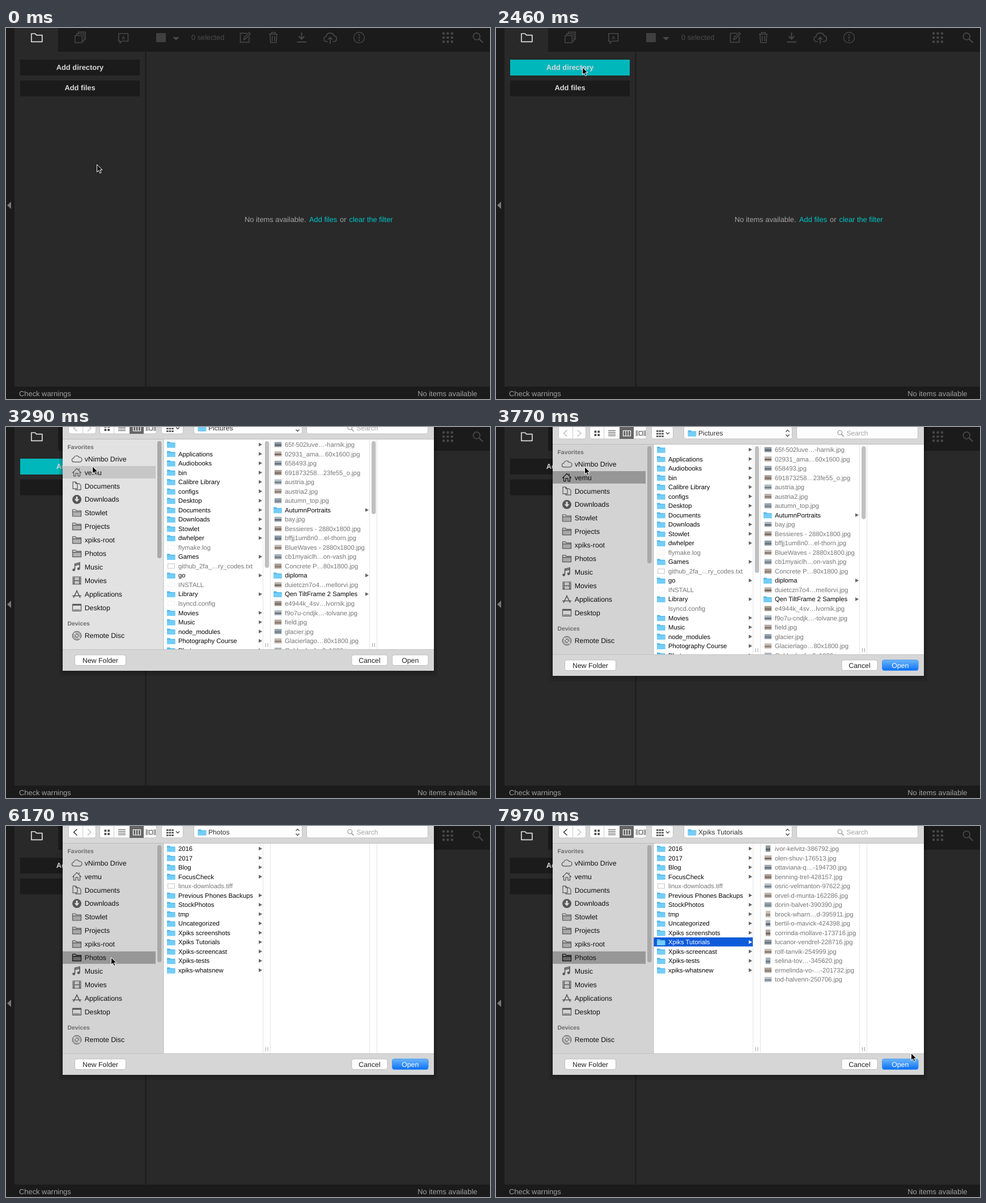
Animation of 854 by 656 pixels, one loop 8 s. Source, as an HTML page:

```html
<!DOCTYPE html>
<html lang="en">
<head>
<meta charset="utf-8">
<title>Add directory</title>
<style>
html, body { margin: 0; width: 100%; height: 100%; overflow: hidden; background: #292929; }
svg { display: block; width: 100%; height: 100%; }
text { font-family: "Liberation Sans", Arial, sans-serif; text-rendering: geometricPrecision; white-space: pre; }
</style>
</head>
<body>
<svg id="stage" viewBox="0 0 854 656"></svg>
<script>
const LOOP = 8000;
const ROW = 16.53;

// Drawing helpers
const rect = (x, y, w, h, fill, more = '') =>
  `<rect x="${x}" y="${y}" width="${w}" height="${h}" fill="${fill}" ${more}/>`;
const text = (x, y, s, size, fill, more = '') =>
  `<text x="${x}" y="${y}" font-size="${size}" fill="${fill}" ${more}>${s}</text>`;
const fillPath = (d, fill, more = '') => `<path d="${d}" fill="${fill}" ${more}/>`;
const line = (d, color, w = 1, more = '') =>
  `<path d="${d}" fill="none" stroke="${color}" stroke-width="${w}" ${more}/>`;
const dot = (x, y, r, fill, more = '') => `<circle cx="${x}" cy="${y}" r="${r}" fill="${fill}" ${more}/>`;
const group = (id, body, more = '') => `<g id="${id}" ${more}>${body}</g>`;
const grid = (n, x, y, step, draw) =>
  Array.from({ length: n * n }, (_, i) => draw(x + i % n * step, y + Math.floor(i / n) * step)).join('');
const MID = 'text-anchor="middle"';
const BOLD = 'font-weight="bold"';

function appWindow() {
  const bar = '#1b1b1b', dim = '#474747';
  const icons = [
    line('M44.8 10h6.5l2.5 2.6h10v11.7h-19z', '#dedede', 1.7, 'stroke-linejoin="round"'),
    line('M121.7 13.5h12.5v12.5h-12.5zM124.6 13v-2.8h13v13h-3M127.7 10v-2.8h12.5v12.6h-2.6', dim, 1.4),
    line('M198.8 9.8h16.6v13.4h-10.5l-3.6 3.5v-3.5h-2.5z', dim, 1.6),
    text(207.2, 20, 'A', 8, dim, `${MID} ${BOLD}`),
    rect(265, 9, 17, 16, '#404040'),
    fillPath('M294 16h12l-6 6z', dim),
    text(327, 21, '0 selected', 12.8, '#4c4c4c'),
    line('M425 9.3h-11.5v16h15.5v-10', dim, 1.6),
    line('M419.5 20.5l1-4 8.5-8.5 2.2 2.3-8.3 8.5z', dim, 1.5),
    line('M464 10.7h15M468.5 10.5v-2.7h6.5v2.7M465.8 11l1 14.8h10l1-14.8M469.7 14v9M474 14v9', dim, 1.6),
    line('M521.5 8v11M516.5 14.5l5 5 5-5M513.5 24.7h16.5', dim, 2),
    line('M568 24h-3a4.6 4.6 0 0 1-.4-9a7.5 7.5 0 0 1 14.4-1.2a5.2 5.2 0 0 1 .3 10.2h-3M572 28v-11M568 20.5l4-4 4 4', dim, 1.7),
    dot(623, 17, 9.5, 'none', `stroke="${dim}" stroke-width="1.3"`),
    [12.3, 17, 21.7].map(y => dot(623, y, 1.4, dim)).join(''),
    grid(3, 770, 7.5, 7.4, (x, y) => rect(x, y, 4.2, 4.2, dim, 'rx="1.4"')),
    dot(830.3, 14.8, 6, 'none', `stroke="${dim}" stroke-width="1.7"`),
    line('M834.7 19.2l6.8 6.8', dim, 2.2)
  ].join('');
  const button = (y, s, id) => rect(25, y, 211, 28, bar, `id="${id}"`) +
    text(130.5, y + 17.6, s, 12.85, '#d8d8d8', `${MID} ${BOLD}`);
  return rect(0, 0, 854, 656, '#292929') +
    rect(0, 0, 15, 656, bar) + rect(92, 0, 762, 42, bar) +
    rect(245.5, 42, 2, 592, '#1c1c1c') + rect(0, 634, 854, 22, bar) +
    fillPath('M9 307v13l-7-6.5z', '#7a7a7a') + icons +
    button(56, 'Add directory', 'addDir') + button(92.7, 'Add files', 'addFiles') +
    text(421, 342.7, 'No items available.', 12.85, '#a3a3a3') +
    text(535, 342.7, 'Add files', 12.85, '#00c4c6') +
    text(589, 342.7, 'or', 12.85, '#a3a3a3') +
    text(605.5, 342.7, 'clear the filter', 12.85, '#00c4c6') +
    text(23, 650.5, 'Check warnings', 12.9, '#a0a0a0') +
    text(831.5, 650.5, 'No items available', 12.9, '#a0a0a0', 'text-anchor="end"');
}

// Sidebar icons, drawn around 0,0 in the colour of their row
const ink = 'currentColor';
const stroke = d => line(d, ink, 1.2, 'stroke-linejoin="round"');
const ICONS = {
  cloud: stroke('M-5 5.5a3.5 3.5 0 0 1-.3-7a5 5 0 0 1 9.3-1.3a4.2 4.2 0 0 1 1.5 8.3z'),
  home: stroke('M-8 1l8-8 8 8M-5.5-1v7.5h3.5v-5h4v5h3.5v-7.5M4-7v3'),
  docs: stroke('M-7-7h5l3 3v9h-8zM-2-7v3h3M1-4h3l3 3v8h-9v-2'),
  down: dot(0, 0, 8, ink) + fillPath('M-1.5-5h3v4.500h3l-4.500 5-4.500-5h3z', '#ddd'),
  folder: rect(-7.5, -3.5, 15, 9.5, ink, 'opacity=".35"') + stroke('M-7.5 6v-12h5l1.5 2h8.5v10zM-7.5-2h15'),
  note: line('M-3.5 4.5v-10l8.5-2v10M-3.5-3l8.5-2', ink, 1.6) + dot(-5.4, 5, 2.4, ink) + dot(3.1, 3, 2.4, ink),
  film: rect(-7.5, -7, 15, 14, ink) + rect(-4, -6, 8, 5.5, '#c4c4c4') + rect(-4, .8, 8, 5.2, '#c4c4c4') +
    line('M-5.8-6v12M5.8-6v12', '#d2d2d2', 1.6, 'stroke-dasharray="1.6 1.4"'),
  apps: line('M-6 6.5l6.5-13M-.5-6.5l6.5 13M-8 3h16', ink, 1.5),
  desk: stroke('M-7.5-6h15v12h-15z') + rect(-7.5, -6, 15, 2.5, ink) +
    line('M-5.5 4h11', ink, 2, 'stroke-dasharray="1.5 1"'),
  disc: dot(0, 0, 7.8, '#b4b4b4', `stroke="${ink}"`) + dot(0, 0, 2.6, '#ddd', `stroke="${ink}"`) +
    line('M-5-4.5l3 2.7M2 2l3.5 3', '#eee', 1.4)
};
const PLACES = [
  ['cloud', 'vNimbo Drive'], ['home', 'vemu'], ['docs', 'Documents'], ['down', 'Downloads'],
  ['folder', 'Stowlet'], ['folder', 'Projects'], ['folder', 'xpiks-root'], ['folder', 'Photos'],
  ['note', 'Music'], ['film', 'Movies'], ['apps', 'Applications'], ['desk', 'Desktop']
];

function sidebar() {
  const item = ([icon, name], y) =>
    group('at-' + name, ICONS[icon], `transform="translate(125 ${y})" color="#565656"`) +
    text(138.7, y + 4.3, name, 12.3, '#111');
  const head = (y, s) => text(108.5, y, s, 10.4, '#6c6c6c', BOLD);
  return rect(100, 31, 178, 371, '#d3d3d3', 'id="side"') + rect(100, 78, 164, 22, '#c6c6c6', 'id="place"') +
    head(48, 'Favorites') + PLACES.map((p, i) => item(p, 65.4 + 23.9 * i)).join('') +
    head(360, 'Devices') + item(['disc', 'Remote Disc'], 378) +
    rect(267, 34, 7.5, 207, '#a9a9a9', 'rx="3.7" id="thumb"');
}

// Column lists: a leading slash marks a folder, an asterisk a picture
const HOME = ('/|/Applications|/Audiobooks|/bin|/Calibre Library|/configs|/Desktop|/Documents|/Downloads|' +
  '/Stowlet|/dwhelper|flymake.log|/Games|github_2fa_…ry_codes.txt|/go|INSTALL|/Library|lsyncd.config|' +
  '/Movies|/Music|/node_modules|/Photography Course|/Photos').split('|');
const PICTURES = ('*65f-502luve…-harnik.jpg|*02931_ama…60x1600.jpg|*658493.jpg|*691873258…23fe55_o.jpg|' +
  '*austria.jpg|*austria2.jpg|*autumn_top.jpg|/AutumnPortraits|*bay.jpg|*Bessieres - 2880x1800.jpg|' +
  '*bffjj1um8n0…el-thorn.jpg|*BlueWaves - 2880x1800.jpg|*cb1myaiclh…on-vash.jpg|*Concrete P…80x1800.jpg|' +
  '/diploma|*duietczn7o4…mellorvi.jpg|/Qen TiltFrame 2 Samples|*e4944k_4sv…lvornik.jpg|' +
  '*f9o7u-cndjk…-tolvane.jpg|*field.jpg|*glacier.jpg|*Glacierlago…80x1800.jpg|*Goldenleaf…0x1800.jpg').split('|');
const PHOTOS = ('/2016|/2017|/Blog|/FocusCheck|linux-downloads.tiff|/Previous Phones Backups|/StockPhotos|/tmp|' +
  '/Uncategorized|/Xpiks screenshots|/Xpiks Tutorials|/Xpiks-screencast|/Xpiks-tests|/xpiks-whatsnew').split('|');
const TUTORIALS = ('*ivor-kelvitz-386792.jpg|*olen-shuv-176513.jpg|*ottaviana-q…-194730.jpg|' +
  '*benning-trel-428157.jpg|*osric-velmanton-97622.jpg|*orvel-d-munta-162286.jpg|*dorin-balvet-390390.jpg|' +
  '*brock-wharn…d-395911.jpg|*bertil-o-mavick-424398.jpg|*corrinda-mollave-173716.jpg|' +
  '*lucanor-vendrel-228716.jpg|*rolf-tanvik-254999.jpg|*selina-tov…-345620.jpg|' +
  '*ermelinda-vo-…-201732.jpg|*tod-halvenn-250706.jpg').split('|');

const folder = (x, y) => fillPath(`M${x} ${y - 5}h5l1.5 1.5h8v9h-14.5z`, '#54b9ea') +
  rect(x, y - 2.2, 14.5, 7.7, '#74cdf7', 'rx=".8"');
const arrow = (x, y, fill) => fillPath(`M${x} ${y - 3.3}l6 3.3-6 3.3z`, fill);

function picture(x, y, i, tall) {
  const [w, h] = tall ? [8, 11] : [12, 8.5];
  const left = x + 6 - w / 2, hue = i % 2 ? 25 : 205;
  const tone = l => `hsl(${hue} 11% ${l}%)`;
  return rect(left - .5, y - h / 2 - .5, w + 1, h + 1, '#ddd') +
    rect(left, y - h / 2, w, h, tone(60 + i * 29 % 17)) +
    rect(left, y - .5, w, h / 3, tone(40 + i * 17 % 15));
}

function row(name, i, x, color, tall) {
  const y = 40 + ROW * i, kind = name[0], dir = kind === '/';
  const label = dir || kind === '*' ? name.slice(1) : name;
  const icon = dir ? folder(x - 20, y) + arrow(x + 142, y, color || '#666')
    : kind === '*' ? picture(x - 18, y, i, tall)
    : rect(x - 18.5, y - 4, 12, 8, '#fff', `stroke="${/tiff|txt/.test(name) ? '#c4c4c4' : '#f1f1f1'}"`);
  return icon + text(x, y + 4, label, 11.3, color || (dir ? '#080808' : '#767676'));
}
const column = (names, x, tall = []) =>
  names.map((n, i) => row(n, i, x, '', tall.includes(i))).join('');
const scroll = (x, h) => rect(x, 34, 7.5, h, '#c0c0c0', 'rx="3.7"');
const handle = x => line(`M${x - 2} 391v7M${x + 2} 391v7`, '#a0a0a0');

function toolbar() {
  const box = (x, w) => rect(x + .5, -1.5, w, 22.5, '#fdfdfd', 'rx="3.5" stroke="#c3c3c3"');
  const dark = '#4a4a4a';
  return rect(100, -30, 655, 61, '#d7d7d7') +
    box(110, 48) + rect(135, -1, 1, 22, '#cfcfcf') +
    line('M125.5 5.5l-6 5.5 6 5.5', '#b8b8b8', 1.4, 'id="back"') +
    line('M144 5.5l6 5.5-6 5.5', '#b8b8b8', 1.2) +
    box(165, 100) + rect(190, -1, 1, 22, '#cfcfcf') + rect(218, -1, 25, 22, '#656565') +
    grid(2, 173.5, 6.5, 5.8, (x, y) => rect(x, y, 3.7, 3.7, dark)) +
    line('M198 6.5h13M198 9.5h13M198 12.5h13M198 15.5h13', dark) +
    line('M224.5 6.5h13v9.5h-13zM228.8 6.5v9.5M233.2 6.5v9.5', '#fff', 1.2) +
    line('M247.5 6v10M249.8 6v10M261.2 6v10M263.5 6v10M252.5 7.5h6v7h-6z', dark) +
    box(274, 38) + grid(3, 283, 6, 4.6, (x, y) => rect(x, y, 3.6, 2.6, dark)) +
    line('M300 9.5l3 3 3-3', dark, 1.4) +
    box(331, 191) + folder(338.7, 11) + text(357, 15.3, '', 12.05, '#333', 'id="title"') +
    line('M511.5 8.5l3-3 3 3M511.5 13.5l3 3 3-3', '#444', 1.3) +
    box(530, 214) + dot(606.8, 10, 3.8, 'none', 'stroke="#888" stroke-width="1.1"') +
    line('M609.5 12.8l4 4', '#888', 1.3) + text(618.5, 15.3, 'Search', 12, '#a4a4a4') +
    rect(100, 30, 655, 1, '#bcbcbc');
}

function sheet() {
  const shadow = pad => rect(100 - pad, -40, 655 + 2 * pad, 481 + 1.4 * pad, '#000', 'opacity=".11"');
  const button = (x, w, s, ids = ['', '']) =>
    rect(x + .5, 412, w, 18.5, '#fff', `rx="3.5" stroke="#bfbfbf" id="${ids[0]}"`) +
    text(x + w / 2 + .5, 425.5, s, 12.3, '#222', `${MID} id="${ids[1]}"`);
  const gutter = x => rect(x, 31, 1, 371, '#e4e4e4') + rect(x + 13, 31, 1, 371, '#e4e4e4');
  const lists = rect(278, 31, 477, 371, '#fff') + gutter(453) + gutter(641) + handle(460) +
    group('home', column(HOME, 304) + column(PICTURES, 492) + scroll(456.7, 224) + scroll(645, 129) + handle(648.5)) +
    group('photos', column(PHOTOS, 304)) +
    group('picked', rect(278, 197, 175, 16, '#0b5bdb') + row(PHOTOS[10], 10, 304, '#fff')) +
    group('tutorials', column(TUTORIALS, 492, [0, 7, 8, 9, 12]) + handle(648.5));
  return shadow(6) + shadow(3) + rect(100, -40, 655, 480, '#d6d6d6') +
    toolbar() + sidebar() + `<g clip-path="url(#lists)">${lists}</g>` +
    rect(277.5, 31, 1, 371, '#bebebe') + rect(100, 402, 655, 1, '#c2c2c2') +
    button(121, 90, 'New Folder') + button(609.5, 63, 'Cancel') + button(681, 63.5, 'Open', ['open', 'openText']);
}

const stage = document.getElementById('stage');
stage.innerHTML = `<defs>
  <clipPath id="lists"><rect x="278" y="31" width="477" height="371"/></clipPath>
  <linearGradient id="blue" x2="0" y2="1"><stop stop-color="#6bb6fb"/><stop offset="1" stop-color="#0a70f7"/></linearGradient>
  </defs>` + appWindow() + group('sheet', sheet()) +
  group('cursor', fillPath('M.5.5v13l3-2.8 2.2 4.9 2.3-1-2.2-4.7h4.2z', '#000', 'stroke="#fff" stroke-width="1"'));

const el = id => document.getElementById(id);
const show = (id, on) => el(id).setAttribute('visibility', on ? 'inherit' : 'hidden');
const set = (id, name, value) => el(id).setAttribute(name, value);
const pick = (table, t) => table.reduce((v, [from, next]) => t >= from ? next : v, table[0][1]);

// Pointer moves: start, end, number of steps, waypoints
const MOVES = [
  [0, 1, 2, [[160, 241], [160, 241]]],
  [1440, 1441, 2, [[155, 227], [155, 227]]],
  [1580, 2190, 8, [[153, 215], [148, 175], [146, 130], [149, 90], [152, 69]]],
  [3770, 4550, 10, [[156, 70], [195, 80], [250, 100], [258, 125], [230, 155], [204, 163]]],
  [4640, 5340, 9, [[202, 168], [191, 197], [181, 232], [178, 249], [185, 232]]],
  [6170, 6800, 8, [[185, 232], [179, 238], [215, 230], [275, 215], [315, 206], [331, 203]]],
  [7330, 7970, 8, [[338, 208], [390, 235], [520, 310], [650, 375], [715, 397], [732, 401]]]
];

function spline(pts, u) {
  const last = pts.length - 1, i = Math.min(Math.floor(u * last), last - 1), s = u * last - i;
  const p = k => pts[Math.max(0, Math.min(last, i + k))];
  return [0, 1].map(c => {
    const [a, b, d, e] = [p(-1)[c], p(0)[c], p(1)[c], p(2)[c]];
    return b + .5 * s * (d - a + s * (2 * a - 5 * b + 4 * d - e + s * (3 * (b - d) + e - a)));
  });
}

function pointer(t) {
  const [start, end, n, pts] = MOVES.filter(m => m[0] <= t).pop();
  const step = Math.min(n - 1, Math.floor((t - start) / (end - start) * (n - 1) + .1));
  return spline(pts, step / (n - 1)).map(Math.round);
}

const DROP = [[3090, -343], [3180, -120], [3290, -9], [3410, 0]];
const TITLE = [[0, 'Pictures'], [5690, 'Photos'], [7160, 'Xpiks Tutorials']];

function render(t) {
  const [x, y] = pointer(t);
  const active = t >= 3410, inPhotos = t >= 5520;
  set('cursor', 'transform', `translate(${x} ${y})`);
  set('addDir', 'fill', t >= 2460 && t < 3560 ? '#00b7bb' : '#1b1b1b');
  show('sheet', t >= 3090);
  set('sheet', 'transform', `translate(0 ${pick(DROP, t)})`);
  set('open', 'fill', active ? 'url(#blue)' : '#fff');
  set('open', 'stroke', active ? '#3b93f7' : '#bfbfbf');
  set('openText', 'fill', active ? '#fff' : '#222');
  set('side', 'fill', active ? '#d3d3d3' : '#e2e2e2');
  set('place', 'fill', active ? '#979797' : '#c6c6c6');
  set('place', 'y', inPhotos ? 221.7 : 78);
  set('at-vemu', 'color', active && !inPhotos ? '#111' : '#565656');
  set('at-Photos', 'color', inPhotos ? '#111' : '#565656');
  set('thumb', 'fill', x > 262 && x < 278 && t > 6170 ? '#8a8a8a' : '#a9a9a9');
  set('back', 'stroke', t < 5690 ? '#b8b8b8' : '#333');
  el('title').textContent = pick(TITLE, t);
  show('home', t < 5690);
  show('photos', t >= 5690);
  show('picked', t >= 7070);
  show('tutorials', t >= 7160);
}

function tick() {
  render(performance.now() % LOOP);
  requestAnimationFrame(tick);
}
tick();
</script>
</body>
</html>
```
